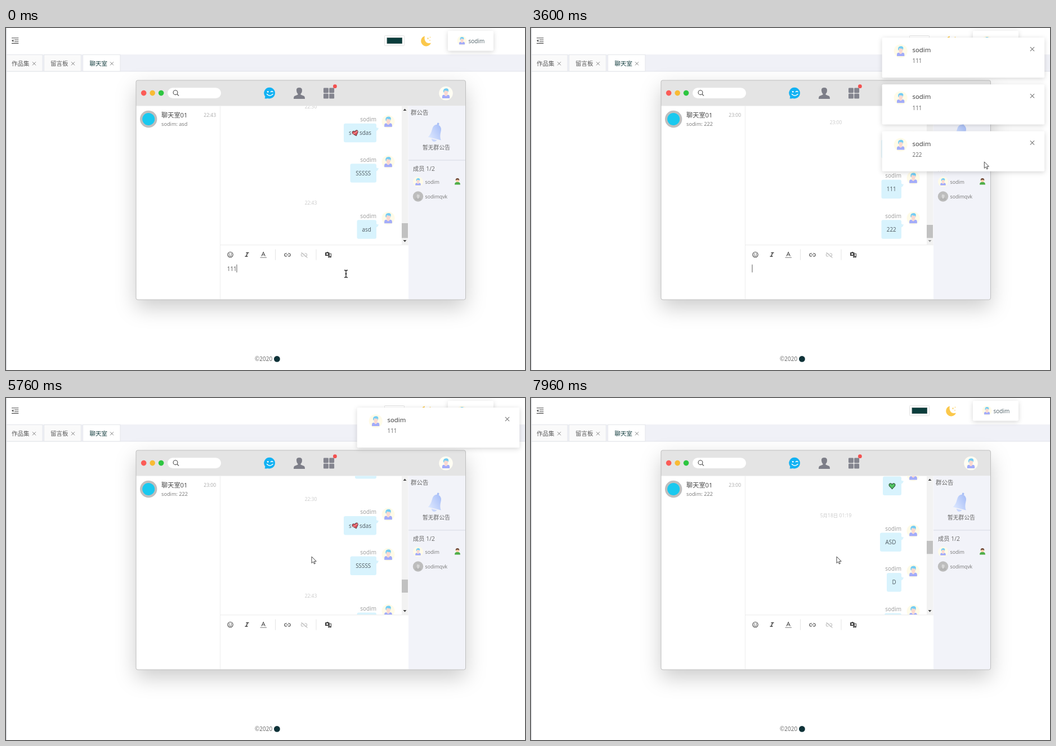
Animation of 922x608 px, one loop 8000 ms. Source, as an HTML page:

```html
<!DOCTYPE html>
<html lang="zh">
<head>
<meta charset="utf-8">
<title>聊天室</title>
<style>
html, body { margin: 0; width: 100%; height: 100%; overflow: hidden; background: #fff; }
svg { display: block; }
text { font-family: "Open Sans", "Noto Sans CJK SC", sans-serif; white-space: pre; }
.card { filter: drop-shadow(0 2px 4px rgba(0, 0, 0, .16)); }
.win { filter: drop-shadow(0 14px 18px rgba(0, 0, 0, .2)); }
.ln { fill: none; stroke: #4c4c4c; stroke-width: 1.1; }
</style>
</head>
<body>
<svg id="stage" width="922" height="608" viewBox="0 0 922 608">
  <defs>
    <linearGradient id="bell" x1="0" x2="1" y1="1" y2="0">
      <stop offset="0" stop-color="#dfe9ff"/><stop offset="1" stop-color="#9db6f6"/>
    </linearGradient>
    <linearGradient id="edge">
      <stop offset="0" stop-color="#c9cbd0"/><stop offset="1" stop-color="#fff" stop-opacity="0"/>
    </linearGradient>
    <clipPath id="chatClip"><path d="M381 138.5H702V385H381Z"/></clipPath>
    <g id="person">
      <path d="M-7 9.500V6Q-7 3.200-3.500 2.800L0 5 3.500 2.800Q7 3.200 7 6V9.500Z" fill="#a3acf9"/>
      <path d="M-3.500-6H3.800V-1Q3 3 2 3.300V4.500L0 5.600-2 4.500V3Q-3.500 1-3.500-2Z" fill="#fbd9d0"/>
      <path d="M-4.500-1.500Q-6-8-1-9 4-10 5-6L4.300-1.500 3.300-4.500Q0-4-2.500-5.500L-3.500-1.500Z" fill="#74cdf3"/>
    </g>
    <path id="heart" d="M0 5L-4.700 0Q-6-2.700-4-4.100-1.600-5 0-2.600 1.600-5 4-4.100 6-2.700 4.700 0Z"/>
    <path id="cross" d="M-3-3L3 3M3-3L-3 3" fill="none" stroke="#777" stroke-width=".9"/>
  </defs>
  <g id="page"></g>
  <g clip-path="url(#chatClip)"><g id="chat"></g></g>
  <g id="bar"></g>
  <g id="live"></g>
  <g id="notes"></g>
  <path id="beam" d="M-3-6.500Q0-6.500 0-5Q0-6.500 3-6.500M0-5V5M-3 6.500Q0 6.500 0 5Q0 6.500 3 6.500M-1.500 0H1.500" fill="none" stroke="#222" stroke-width="1.300"/>
  <path id="arrow" d="M0 0V11.500L2.700 9 4.500 13 6.300 12.200 4.600 8.300H8.200Z" fill="#fff" stroke="#333" stroke-width=".9"/>
</svg>
<script>
const LOOP = 8000;
const USER = 'sodim', MEMBER = 'sodimqvk';
const $ = id => document.getElementById(id);

const rect = (x, y, w, h, fill, extra = '') =>
  `<rect x="${x}" y="${y}" width="${w}" height="${h}" fill="${fill}" ${extra}/>`;
const disc = (x, y, r, fill) => `<circle cx="${x}" cy="${y}" r="${r}" fill="${fill}"/>`;
const text = (x, y, size, fill, str, extra = '') =>
  `<text x="${x}" y="${y}" font-size="${size}" fill="${fill}" ${extra}>${str}</text>`;
const path = (d, fill, extra = '') => `<path d="${d}" fill="${fill}" ${extra}/>`;
const line = d => `<path class="ln" d="${d}"/>`;
const use = (id, x, y, extra = '', scale = 1) =>
  `<use href="#${id}" transform="translate(${x} ${y}) scale(${scale})" ${extra}/>`;
const avatar = (x, y, r, scale = 1, bg = '#fffbe8') => disc(x, y, r, bg) + use('person', x, y, '', scale);

// ---- static page ----
function topBar() {
  const tabs = [['作品集', -2, 67, 10, 50], ['留言板', 67.5, 66, 79, 119], ['聊天室', 136.5, 66.5, 148.5, 188]];
  return rect(0, 47, 922, 30, '#f0f1f7') + rect(0, 76.5, 922, 1, '#e2e4ea') +
    tabs.map(([name, x, w, tx, cx], i) =>
      rect(x, 47.5, w, 29.5, i === 2 ? '#fff' : '#fafafa', 'stroke="#e3e5ea"') +
      text(tx, 66.7, 10.5, i === 2 ? '#153f40' : '#595959', name) + use('cross', cx, 63.3)).join('') +
    line('M10 17.700H22.300M15 21H22.300M15 24.200H22.300M10 27.400H22.300') +
    path('M10 22.600L13.300 20.200V25Z', '#4c4c4c') +
    rect(672.5, 13.500, 35, 18, '#fff', 'stroke="#e4e4e4" rx="1"') +
    rect(677, 17.500, 26.500, 10, '#0b3d3c', 'stroke="#34504f" stroke-width=".8"') +
    path('M744 14.300A9.200 9.200 0 1 0 755 26.500Q748 28.500 745 23.500Q742.500 18.500 744 14.300Z', '#fbc84b') +
    disc(749.5, 18.500, 1.500, '#fbdc8c') + disc(753.5, 16.500, 1, '#fbdc8c') + disc(753, 22, 1, '#fbdc8c') +
    `<g class="card">${rect(785, 5, 81, 35.5, '#fff', 'rx="2"')}</g>` +
    avatar(810, 22.5, 8.5, .72) + text(821.5, 26.700, 10, '#4d5f66', USER);
}

function windowHead() {
  const grid = [[564, 106.500], [574.2, 106.500], [564, 116.7], [574.2, 116.7]];
  return `<g class="win">${rect(231, 93, 585.5, 390, '#fff', 'rx="3"')}</g>` +
    path('M231 138.500V96Q231 93 234 93H813.500Q816.500 93 816.500 96V138.500Z', '#e4e4e4') +
    disc(244.7, 115.6, 4.8, '#fb5c57') + disc(260.2, 115.6, 4.8, '#f8bb35') + disc(275.6, 115.6, 4.8, '#2dc640') +
    rect(287, 106.300, 95, 18.700, '#fff', 'rx="9.300"') +
    '<circle class="ln" cx="301" cy="114.700" r="3.900"/>' + line('M303.800 117.500L307 120.700') +
    path('M468.500 105.700A9.900 9.900 0 1 1 465 125Q461.500 126 459.500 125.300Q460.500 123.500 460.300 121.500A9.900 9.900 0 0 1 468.500 105.700Z', '#12b2f3') +
    disc(465.2, 113.300, 1.400, '#fff') + path('M470.500 113.500Q472.300 111.700 474 113.500M463.500 117.500Q468.500 123 474 117.500', 'none', 'stroke="#fff" stroke-width="1.500" stroke-linecap="round"') +
    path('M516 110Q516 106 521 106 526 106 526 110.500 526 115 523.500 117V118.500L529.500 121Q531 122 531 126H511Q511 122 512.500 121L518.500 118.500V117Q516 115 516 110Z', '#7d7e88') +
    grid.map(([x, y]) => rect(x, y, 8.9, 8.900, '#83848e', 'rx="1.300"')).join('') +
    disc(584.4, 103.700, 3.400, '#f4504f') + avatar(781.5, 116, 12.3, .95, '#fffdf3');
}

function sidePanels() {
  return rect(380, 138.5, 1, 344, '#ededed') +
    disc(253.2, 162, 15.2, '#bfbfbf') + disc(253.2, 162, 11, '#19c9ef') +
    text(276, 158.5, 11.2, '#444', '聊天室01') +
    rect(715, 138.5, 101, 344, '#f2f3f9') + rect(715, 234.5, 101, 1, '#d8dae4') +
    text(719, 154.200, 10.5, '#666', '群公告') +
    `<g transform="translate(764 185) rotate(14)">` +
    path('M-12 12Q-8 7-8-3-8-12 0-14 8-12 8-3 8 7 12 12Z', 'url(#bell)') +
    disc(0, -15, 1.900, '#a9bff6') + path('M-5 13.500H5Q3 17.500 0 17.500-3 17.500-5 13.500Z', '#c9d7fc') + '</g>' +
    text(740, 216.200, 9.800, '#666', '暂无群公告') + text(723, 254, 10.3, '#666', '成员 1/2') +
    avatar(732, 273.300, 9, .68) + text(744.5, 276.600, 8.800, '#777', USER) +
    path('M797 278.500Q797 274.500 800 274H804Q807 274.500 807 278.500Z', '#4fae48') +
    disc(802, 271, 2.900, '#f6cfa6') + path('M798.700 271Q798.500 267 802 267 805.500 267 805.300 271 802 268.500 798.700 271Z', '#714a37') +
    disc(732, 299.500, 9.200, '#bdbdbd') + use('person', 732, 299.5, 'opacity=".75" style="filter:grayscale(1)"', .72) +
    text(744.5, 302.800, 8.800, '#777', MEMBER);
}

function editor() {
  const chain = 'M499 400.700H497.500A2.500 2.500 0 0 0 497.500 406H499M501 400.700H502.500A2.500 2.500 0 0 1 502.500 406H501M498 403.300H502';
  return rect(381, 385.2, 334, 1, '#ebebeb') +
    '<circle class="ln" cx="398.500" cy="403" r="4.700"/>' + disc(396.7, 401.800, .9, '#444') + disc(400.300, 401.8, .9, '#444') +
    line('M396 404Q398.500 407.500 401 404') +
    path('M426.500 399.500H431.500M424.500 406H429.500M429.200 399.500L426.700 406', 'none', 'stroke="#444" stroke-width="1.500"') +
    line('M454 405.500L457.200 398.500 460.400 405.500M455.300 403.200H459') + path('M451.500 408H463', 'none', 'stroke="#777"') +
    rect(478, 393.5, 1, 19, '#e4e4e4') + rect(550.5, 393.5, 1, 19, '#e4e4e4') +
    line(chain) + `<g opacity=".35" transform="translate(29.500 0)">${line(chain + 'M495 399L506 408.500')}</g>` +
    path('M567 399H569L570 398H572L573 399H574.500V405H567Z', '#444') + disc(570.7, 401.8, 1.600, '#fff') +
    line('M574.500 406.500V401.300H577.500V406.500') + disc(573.5, 406.700, 1.500, '#444') + disc(576.5, 406.700, 1.500, '#444');
}

$('page').innerHTML = topBar() + windowHead() + sidePanels() + editor() +
  rect(231, 93, 585.5, 390, 'none', 'rx="3" stroke="#b9b9b9" stroke-width=".9"') +
  text(442, 592.300, 10, '#666', '©2020') + disc(481.4, 588.4, 5.4, '#0e3339') +
  rect(0, 0, 3, 608, 'url(#edge)');

// ---- messages, newest first: text, bubble width, time above ----
const messages = [
  ['222', 35.5], ['111', 35.5], ['111', 35.5, '23:00'], ['asd', 34.5, '22:43'],
  ['SSSSS', 46.500], ['love', 58, '22:30'], ['DSA', 38, '5月19日 09:12'], ['S', 24],
  ['D', 26], ['S', 24, '5月18日 01:39'], ['DSA', 38, '5月18日 01:32'], ['SD', 30],
  ['D', 26], ['ASD', 38, '5月18日 01:19'], ['green', 33], ['D', 26], ['ASD', 38]
];

function bubbleText(str, cx, y) {
  if (str === 'green') return use('heart', cx, y - 3.5, 'fill="#52c564" stroke="#2d5a38"', 1.05);
  if (str === 'love') return text(609, y, 9.900, '#4f5a60', 's') + text(628, y, 9.900, '#4f5a60', 'sdas') +
    `<g transform="translate(620.700 ${y - 3.500}) rotate(-18)">${use('heart', 0, 0, 'fill="#e0525b" stroke="#67474c"')}` +
    path('M-6 1L5-2', 'none', 'stroke="#f7b4b4"') + '</g>';
  return text(cx, y, 9.900, '#4f5a60', str, 'text-anchor="middle"');
}

let y = 334;
$('chat').innerHTML = messages.map(([str, w, time]) => {
  const out = text(658, y + 3.500, 10, '#999', USER, 'text-anchor="end"') +
    avatar(679, y + 4, 11.5, .98) +
    rect(658 - w, y + 7.300, w, 33.5, '#d8f3fd', 'rx="3"') +
    path(`M657 ${y + 13}Q659.500 ${y + 16} 662 ${y + 15}Q661 ${y + 20} 657 ${y + 20.500}Z`, '#d8f3fd') +
    bubbleText(str, 658 - w / 2, y + 27.800) +
    (time ? text(541.5, y - 19.800, 8.500, '#c9c9c9', time, 'text-anchor="middle"') : '');
  y -= time ? 100 : 71.5;
  return out;
}).join('');

$('bar').innerHTML = rect(703, 138.5, 11.500, 247, '#f2f2f2') +
  path('M705.500 147L708.500 143.500 711.500 147Z', '#444') +
  '<path id="down" d="M705.500 377L708.500 380.500 711.500 377Z"/><rect id="thumb" x="703" width="11" fill="#c1c1c1"/>';

$('live').innerHTML = text(373, 157.5, 8.500, '#aaa', '', 'id="clock" text-anchor="end"') +
  text(276, 173.500, 9.200, '#777', '', 'id="last"') +
  text(392.8, 432.400, 9.900, '#555', '', 'id="draft"') + rect(393, 420.5, 1, 14, '#333', 'id="caret"');

// ---- notifications: text, enter, leave ----
const notes = [['111', 360, 4870], ['111', 1560, 5990], ['222', 2560, 4130]];
const GAP = 83.25;
$('notes').innerHTML = notes.map(([str]) => `<g><g class="card">${rect(623.7, 17, 288.5, 71.3, '#fff', 'rx="2"')}</g>` +
  avatar(656.7, 41, 12, .95) + text(677.5, 43.200, 11.400, '#333', USER) +
  text(677.5, 62.300, 9.900, '#666', str) + use('cross', 890.5, 37.5, '', 1.2) + '</g>').join('');
const noteEls = [...$('notes').children];

// ---- timeline ----
const clamp = v => Math.max(0, Math.min(1, v));
const span = (t, start, dur) => clamp((t - start) / dur);
const smooth = p => p * p * p * (10 - 15 * p + 6 * p * p);
// CSS "ease": cubic-bezier(.25, .1, .25, 1)
function ease(p) {
  let lo = 0, hi = 1, u = .5;
  for (let i = 0; i < 14; i++) {
    u = (lo + hi) / 2;
    const x = .75 * u * (1 - u) + u ** 3;
    if (x < p) lo = u; else hi = u;
  }
  return .3 * u * (1 - u) ** 2 + 3 * u * u * (1 - u) + u ** 3;
}
const at = (steps, t) => steps.reduce((v, [time, val]) => t >= time ? val : v, steps[0][1]);

const drafts = [[0, '111'], [320, ''], [760, '1'], [1080, '11'], [1240, '111'], [1400, ''],
  [1880, '2'], [2080, '22'], [2320, '222'], [2440, '']];
const sent = [[0, 0], [320, 1], [1400, 2], [2440, 3]];
const caretOn = [[0, 1], [80, 0], [320, 1], [3000, 0], [3480, 1], [4040, 0]];
const shift = [243, 143, 71.5, 0], thumbTop = [347, 348, 349, 350];
const wheel = [5155, 5605, 6115, 6655, 7052, 7445, 7838];
const route = [[3160, 604, 437], [3400, 712, 338], [3600, 805, 238], [3880, 888, 203],
  [4000, 890, 202], [4280, 890, 203], [4500, 826, 200], [4720, 754, 213], [4960, 640, 252], [5160, 543, 282]];

function pointer(t) {
  const i = route.findIndex(p => p[0] > t);
  if (i === 0) return route[0].slice(1);
  if (i < 0) return route[route.length - 1].slice(1);
  const [a, b] = [route[i - 1], route[i]], p = (t - a[0]) / (b[0] - a[0]);
  return [a[1] + (b[1] - a[1]) * p, a[2] + (b[2] - a[2]) * p];
}

const setText = (id, str) => { if ($(id).textContent !== str) $(id).textContent = str; };

function draw(t) {
  const n = at(sent, t), draft = at(drafts, t);
  const scroll = wheel.reduce((sum, w) => sum + 150 * smooth(span(t, w, 210)), 0);

  setText('clock', n ? '23:00' : '22:43');
  setText('last', `${USER}: ${['asd', '111', '111', '222'][n]}`);
  setText('draft', draft);
  $('caret').setAttribute('x', 392.5 + draft.length * 5.66);
  $('caret').style.opacity = at(caretOn, t) * .8;

  $('chat').setAttribute('transform', `translate(0 ${shift[n] + scroll})`);
  $('thumb').setAttribute('y', thumbTop[n] - scroll * .0962);
  $('thumb').setAttribute('height', 373.3 - thumbTop[n]);
  $('down').setAttribute('fill', n === 3 && scroll < 1 ? '#999' : '#444');

  let top = 0;
  notes.forEach(([, enter, leave], i) => {
    const come = ease(span(t, enter, 200)), gone = ease(span(t, leave, 200));
    noteEls[i].setAttribute('transform', `translate(${288 * (1 - come)} ${top})`);
    noteEls[i].setAttribute('opacity', come * (1 - gone));
    top += GAP * (1 - gone);
  });

  const [x, py] = pointer(t), typing = x < 715 && py > 386;
  for (const [id, on] of [['beam', typing], ['arrow', !typing]]) {
    $(id).setAttribute('transform', `translate(${x} ${py})`);
    $(id).style.display = on ? '' : 'none';
  }
}

const start = performance.now();
function tick() {
  draw((performance.now() - start) % LOOP);
  requestAnimationFrame(tick);
}
tick();
</script>
</body>
</html>
```
